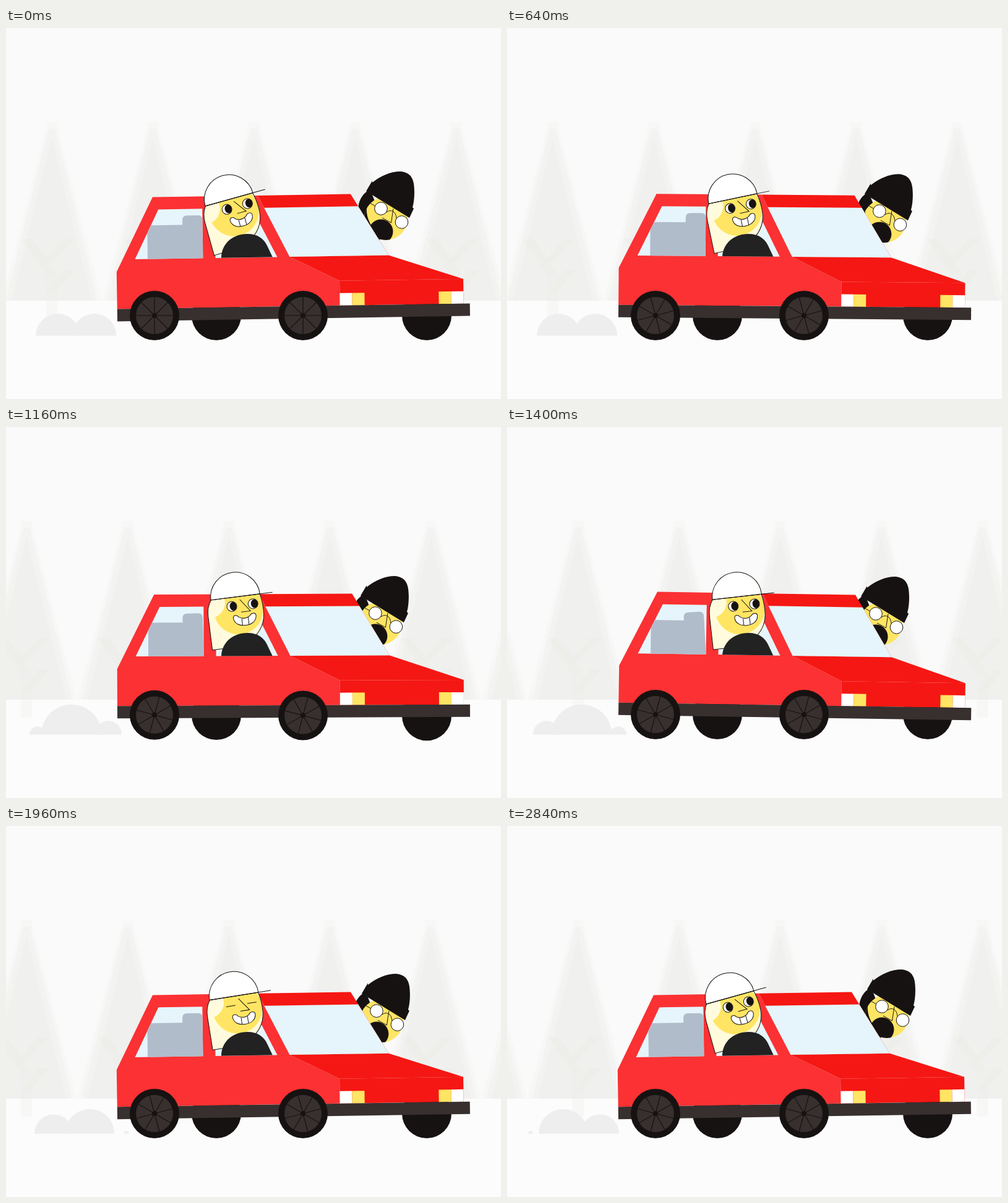
Write an HTML page with a canvas that moves like this. It is 800 px wide and 600 px high and loops after 2.88 s.

```html
<!DOCTYPE html>
<html lang="en">
<head>
<meta charset="utf-8">
<title>Road trip</title>
<style>
  html, body { margin: 0; width: 100%; height: 100%; overflow: hidden; background: #fafafa; }
  canvas { display: block; }
</style>
</head>
<body>
<canvas id="stage" width="800" height="600"></canvas>
<script>
const ctx = document.getElementById('stage').getContext('2d');
const STEP = 40, STEPS = 72, TAU = Math.PI * 2;
const RED = '#fb3133', DEEP_RED = '#f51713', BLACK = '#171212', IRON = '#382f2f';
const GLASS = '#e6f5fb', SKIN = '#ffe563', SEAT = '#b1bccb', WHITE = '#fff';

const deg = a => a * Math.PI / 180;
const wave = (k, period) => Math.cos(TAU * k / period);
const bump = (k, centre, width) => {
  const d = Math.abs(k - centre) / width;
  return d < 1 ? (1 + Math.cos(Math.PI * d)) / 2 : 0;
};

function paint(path, fill, stroke, width = 1) {
  if (fill) { ctx.fillStyle = fill; ctx.fill(path); }
  if (stroke) { ctx.strokeStyle = stroke; ctx.lineWidth = width; ctx.stroke(path); }
}
const shape = (d, fill, stroke, width) => paint(new Path2D(d), fill, stroke, width);
const poly = (points, fill) => shape('M' + points + 'Z', fill);
function box(x, y, w, h, fill) { ctx.fillStyle = fill; ctx.fillRect(x, y, w, h); }
function disc(x, y, r, fill, stroke, width) {
  const path = new Path2D();
  path.arc(x, y, r, 0, TAU);
  paint(path, fill, stroke, width);
}
function group(draw) { ctx.save(); draw(); ctx.restore(); }
function turnAbout(x, y, angle) {
  ctx.translate(x, y); ctx.rotate(deg(angle)); ctx.translate(-x, -y);
}

function scenery(k) {
  const gap = 163.4;
  const eachTree = draw => {
    for (let i = -1; i < 7; i++) group(() => {
      ctx.translate(74 - (k % 4) * gap / 4 + i * gap, 0);
      draw();
    });
  };
  box(0, 441, 800, 159, '#fcfcfc');
  eachTree(() => poly('-9 152 9 152 9 162 81 441 -81 441 -9 162', '#f7f7f6'));
  eachTree(() => {
    poly('-5 163 5 163 74 441 -74 441', '#f3f3f2');
    poly('0 178 65 441 -65 441', '#f0f0ef');
    box(-9, 400, 18, 70, 'rgba(238,238,236,.4)');
    const leaf = 'rgba(234,238,228,.45)';
    poly('-49 341 -31 341 9 400 -9 400', leaf);
    poly('18 341 37 341 -2 379 -14 379', leaf);
    poly('19 391 38 391 4 429 -9 429', leaf);
    shape('M-44 343L-8 380M-38 343L-6 374M24 343L-10 377M32 343L-4 378M25 393L-5 427M33 393L0 428',
      null, 'rgba(226,234,218,.4)', 1);
  });
}

function dust(k) {
  for (let age = k % 8; age < 24; age += 8) {
    const x = 202 - 7.4 * age + Math.max(0, age - 16) * 0.9;
    const path = new Path2D();
    path.arc(x, 497.5, 4.43 * Math.min(age, 24 - age), Math.PI, TAU);
    paint(path, '#eee');
  }
}

function passenger(k) {
  const lean = 5 * (1 - wave(k, STEPS));
  group(() => {
    ctx.translate(-lean, lean);
    shape('M584 264C572 272 566 288 570 310L604 343L612 320L592 270Z', BLACK);
    const face = new Path2D();
    face.arc(614, 308, 35, 0, TAU);
    group(() => {
      ctx.clip(face);
      box(570, 260, 90, 90, SKIN);
      shape('M570 260L592 268Q582 281 583 298Q584 310 592 322L604 350H570Z', BLACK);
      disc(606, 329, 19.5, BLACK);
    });
    shape('M586 282L597 288M626 292L622.500 315L608 307M615 298C621 293 630 295 631 308', null, BLACK);
    disc(606, 292, 10.3, WHITE, BLACK);
    disc(639.5, 314, 10.3, WHITE, BLACK);
    shape('M592 250C606 239 621 232 638 232C656 234 660 246 660 265Q660 280 657 290L659 292L652 307L582 264L592 247Z', BLACK);
  });
}

function wheelLift(k, x) {
  const swing = bump(k, 23, 3) - 0.75 * bump(k, 27, 4);
  return -swing * x * 0.0087;
}

function wheel(x, k) {
  group(() => {
    ctx.translate(x, 465 + wheelLift(k, x));
    disc(0, 0, 40, BLACK);
    disc(0, 0, 30, IRON);
    ctx.rotate(deg(k * 30));
    for (let i = 0; i < 4; i++) {
      shape('M-30 0H30', null, BLACK, 1.2);
      ctx.rotate(Math.PI / 4);
    }
    disc(0, 0, 4, BLACK);
  });
}

function seats(k) {
  group(() => {
    ctx.clip(new Path2D('M249 290H320V370H210Z'));
    ctx.translate(0, -3 * bump(k, 23, 6));
    box(230.5, 315.5, 82, 60, SEAT);
    turnAbout(320, 370, -4 * bump(k, 35, 10));
    shape('M287.500 376V308Q287.500 300.500 295 300.500H313Q320 300.500 320 308V376Z', SEAT);
  });
}

function carBody(k) {
  poly('410 270 560 270 620 370 460 370', DEEP_RED);
  poly('240 270 410 270 460 370 540 410 540 450 180 450 180 390', RED);
  poly('460 370 620 370 740 410 540 410', DEEP_RED);
  box(540, 410, 200, 40, DEEP_RED);
  poly('420 290 572 290 620 370 460 370', GLASS);
  poly('249 290 320 290 320 370 210 370', GLASS);
  poly('340 290 400 290 440 370 340 370', GLASS);
  seats(k);
  box(540, 430, 20, 20, WHITE);
  box(560, 430, 20, 20, SKIN);
  box(700, 430, 20, 20, SKIN);
  box(720, 430, 20, 20, WHITE);
  box(180, 450, 570, 20, IRON);
}

function driverHead(k) {
  const hair = new Path2D('M-42-71Q-50-60-50-45V9.500H-20L15 0Q40-15 40-45Q40-60 37-71Z');
  const open = Math.max(0.02, Math.min(1, Math.abs(k - 49) / 3));
  group(() => {
    ctx.translate(382, 345);
    ctx.rotate(deg(-11 - 4.65 * wave(k, STEPS)));
    paint(hair, '#fffbdc');
    group(() => {
      ctx.clip(hair);
      disc(0, -50, 40, SKIN);
      disc(-45, -67, 25, '#fffbdc');
    });
    paint(hair, null, BLACK);
    for (const x of [-10, 24.5]) {
      if (open < 0.1) {
        shape(`M${x - 7.5}-56H${x + 7.5}`, null, BLACK);
      } else group(() => {
        ctx.translate(x, -56.5);
        ctx.scale(1, open);
        disc(0, 0, 8, WHITE, BLACK);
        const pupil = new Path2D();
        pupil.ellipse(2.2, 0, 5.6, 7, 0, 0, TAU);
        paint(pupil, BLACK);
      });
    }
    shape('M4-66L19-45.500H4', null, BLACK);
    shape('M-10-38C-9-43-3-42-1-38Q8-32 17-38C19-42 26-43 27-38C27-28 18-23.500 8.500-23.500C-1-23.500-10-28-10-38Z',
      WHITE, BLACK);
    shape('M3.500-35V-24M14-36V-24', null, BLACK);
    shape('M-42.500-71A40 40 0 0 1 37.500-71Z', WHITE, BLACK);
    shape('M-42.500-71H58', null, BLACK);
  });
}

function shoulders(tilt) {
  group(() => {
    ctx.clip(new Path2D('M300 300H460V370H300Z'));
    turnAbout(465, 470, -tilt);
    shape('M348 376V370C349 348 367 333 390 333C407 333 417 341 422 352L431 371V376Z', '#222');
  });
}

function draw(k) {
  const tilt = -0.9 * wave(k, 24);
  const tilted = part => group(() => { turnAbout(465, 470, tilt); part(); });
  box(0, 0, 800, 600, '#fafafa');
  scenery(k);
  dust(k);
  passenger(k);
  for (const x of [340, 680]) disc(x, 465 + wheelLift(k, x), 40, BLACK);
  tilted(() => carBody(k));
  driverHead(k);
  tilted(() => shoulders(tilt));
  wheel(240, k);
  wheel(480, k);
}

const start = performance.now();
function tick() {
  draw(Math.floor((performance.now() - start) / STEP) % STEPS);
  requestAnimationFrame(tick);
}
tick();
</script>
</body>
</html>
```
